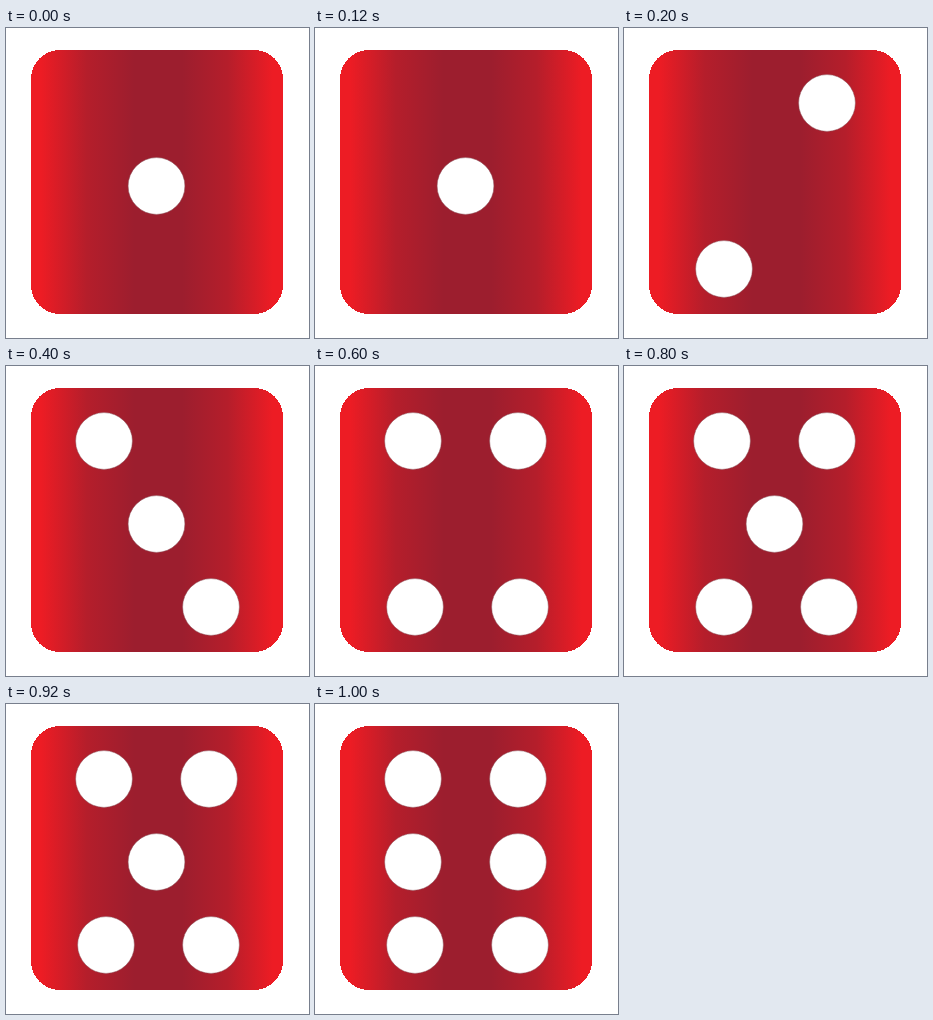
These frames come from a looping animation (303x310 px, 1200 ms). An HTML page:

```html
<!DOCTYPE html>
<html lang="en">
<head>
<meta charset="utf-8">
<title>Die</title>
<style>
html, body { margin: 0; width: 100%; height: 100%; overflow: hidden; background: #fff; }
svg { display: block; width: 100%; height: 100%; }
</style>
</head>
<body>
<svg viewBox="0 0 303 310">
  <defs>
    <linearGradient id="red">
      <stop offset=".04" stop-color="#ed1c24"/>
      <stop offset=".22" stop-color="#b51e2b"/>
      <stop offset=".41" stop-color="#9c1e2e"/>
      <stop offset=".6" stop-color="#9c1e2e"/>
      <stop offset=".78" stop-color="#b51e2b"/>
      <stop offset=".96" stop-color="#ed1c24"/>
    </linearGradient>
  </defs>
  <rect x="25" y="22" width="252" height="264" rx="29" fill="url(#red)" shape-rendering="crispEdges"/>
  <g id="pips" fill="#fff" stroke="#8a5058" stroke-width=".5"></g>
</svg>
<script>
const STEP = 200;
const pips = document.getElementById("pips");
let shown = 0;

// col and row run from -1 to 1; the bottom row sits slightly to the right
function pip(col, row) {
  const x = 150.5 + 52.5 * col + (row > 0 ? 2 : 0);
  const y = 158 + 83 * row;
  return `<circle cx="${x}" cy="${y}" r="28.4"/>`;
}

const pair = (col, row) => pip(col, row) + pip(-col, -row);

function face(n) {
  let out = "";
  if (n % 2) out += pip(0, 0);
  if (n > 2) out += pair(-1, -1);
  if (n === 2 || n > 3) out += pair(1, -1);
  if (n === 6) out += pair(-1, 0);
  return out;
}

function draw(now) {
  const n = Math.floor(now / STEP) % 6 + 1;
  if (n !== shown) pips.innerHTML = face(shown = n);
  requestAnimationFrame(draw);
}
draw(0);
</script>
</body>
</html>
```
